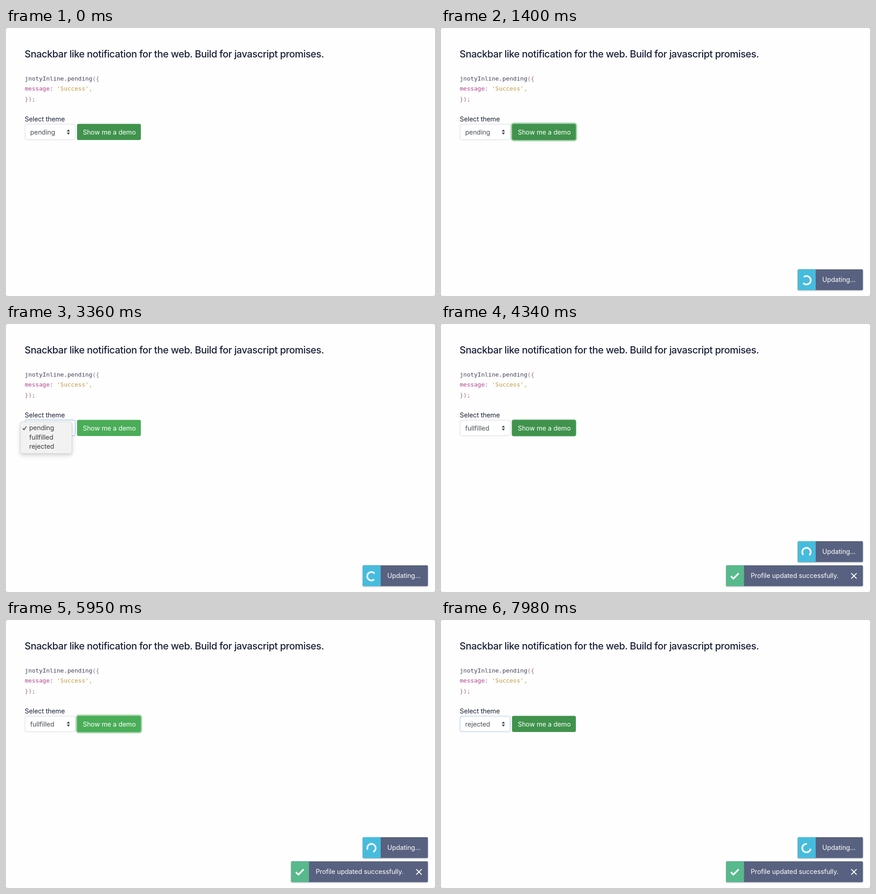
Animation of 948 by 591 pixels, one loop 8 s. Source, as an HTML page:

```html
<!DOCTYPE html>
<html lang="en">
<head>
<meta charset="utf-8">
<title>Snackbar demo</title>
<style>
  html, body { margin: 0; width: 100%; height: 100%; overflow: hidden; background: #fefefe; }
  svg { display: block; width: 100%; height: 100%; }
  text { font: 400 14.5px Inter, sans-serif; letter-spacing: -.1px; white-space: pre; }
  .title { font-size: 21.6px; font-weight: 500; letter-spacing: -.487px; fill: #1a2138; }
  .code text { font: 13.06px "DejaVu Sans Mono", monospace; letter-spacing: 0; fill: #45415f; }
  .code .key { fill: #b04889; }
  .code .str { fill: #c0993f; }
  .code .sym { fill: #997089; }
  .label { fill: #1a2138; }
  .value { fill: #495057; }
  .light { fill: #fff; }
  .toast { filter: drop-shadow(0 1px 1.5px rgba(40, 50, 80, .45)); }
  .toast text { letter-spacing: -.14px; }
  #menu .panel { filter: drop-shadow(0 4px 4px rgba(0, 0, 0, .16)); }
  #menu text { fill: #3c3c3e; }
</style>
</head>
<body>
<svg viewBox="0 0 948 591">
  <rect width="948" height="591" fill="#fefefe"/>
  <path d="M0 0h2L0 2zM948 0v2l-2-2zM0 591v-2l2 2zM948 591h-2l2-2z" fill="#9a9a9a"/>

  <text class="title" x="41" y="65">Snackbar like notification for the web. Build for javascript promises.</text>

  <g class="code">
    <text x="41.5" y="116">jnotyInline.pending<tspan class="sym">({</tspan></text>
    <text x="41.5" y="138.3" class="key">message: <tspan class="str">'Success',</tspan></text>
    <text x="41.5" y="160.5" class="sym">});</text>
  </g>

  <text class="label" x="41.5" y="206">Select theme</text>

  <rect id="glow" x="42" y="212" width="111" height="34.5" rx="3.7" fill="none" stroke="#d6e6fb" stroke-width="3"/>
  <rect id="field" x="42" y="212" width="111" height="34.5" rx="3.7" fill="#fff"/>
  <text id="value" class="value" x="53.5" y="235"></text>
  <path d="M134.2 228.3l3.6-4.2 3.6 4.2zM134.2 230.7l3.6 4.2 3.6-4.2z" fill="#3a4048"/>

  <rect id="ring" fill="#a8d4ad"/>
  <rect id="button" x="157" y="211.5" width="141" height="35.5" rx="3.7"/>
  <text class="light" x="169.7" y="235">Show me a demo</text>

  <g id="menu">
    <rect class="panel" x="31.5" y="215.8" width="114.3" height="70" rx="4.5" fill="#f2f2f2" stroke="#c9c9c9" stroke-width=".8"/>
    <rect id="mark" x="31.5" width="114.3" height="20.6" fill="#6b9ff4"/>
    <g id="items"></g>
    <path id="tick" fill="none" stroke="#333" stroke-width="1.6" d="M37 0l2.7 3.1 5.2-7.2"/>
  </g>

  <g id="updating" class="toast">
    <rect x="788.6" y="532.2" width="143.6" height="45.8" rx="2" fill="#58617f"/>
    <path d="M828 532.2v45.8h-37.4q-2 0-2-2v-41.8q0-2 2-2z" fill="#46bcdd"/>
    <path id="spinner" d="M6.4-6.7A9.3 9.3 0 1 0 6.4 6.7" fill="none" stroke="#fff" stroke-width="3.6"/>
    <text class="light" x="842.6" y="560">Updating...</text>
  </g>

  <g id="done" class="toast">
    <rect x="630.2" y="532.2" width="302" height="45.8" rx="2" fill="#58617f"/>
    <path d="M669.6 532.2v45.8h-37.4q-2 0-2-2v-41.8q0-2 2-2z" fill="#57b98c"/>
    <path d="M640.6 556l5.6 5.5 11.6-11.8" fill="none" stroke="#fff" stroke-width="3.6"/>
    <text class="light" x="684.5" y="560">Profile updated successfully.</text>
    <path d="M906.5 549.5l12 12m0-12l-12 12" stroke="#fff" stroke-width="1.8"/>
  </g>
</svg>
<script>
const LOOP = 8000, STEP = 70, FADE = 150, SPIN = 785;
const ROW = 20.5;
const BUTTON = { x: 157, y: 211.5, width: 141, height: 35.5, rx: 3.7 };
const themes = ['pending', 'fullfilled', 'rejected'];
const $ = id => document.getElementById(id);
const set = (id, attrs) => {
  for (const k in attrs) $(id).setAttribute(k, attrs[k]);
};
const show = (id, on) => set(id, { opacity: +on });

// pointer and focus times
const clicks = [420, 4270];
const menus = [
  { open: 3010, hover: 3640, pick: 3850, from: 0 },
  { open: 6370, hover: 6720, pick: 7630, from: 1 }
];
const hovers = [[-FADE, 2240], [4060, 5740], [7770, 9000]];

$('items').innerHTML = themes
  .map((name, i) => `<text x="51.3" y="${234 + i * ROW}">${name}</text>`).join('');

const ease = x => {
  x = Math.min(1, Math.max(0, x));
  return x * x * (3 - 2 * x);
};
// 0..1 level that rises at a and falls at b
const level = (t, a, b) => ease((t - a) / FADE) - ease((t - b) / FADE);
const sum = (list, f) => list.reduce((s, x, i) => s + f(x, i), 0);
const mix = (a, b, k) => `rgb(${a.map((v, i) => Math.round(v + (b[i] - v) * k))})`;

function drawButton(t) {
  const hover = sum(hovers, ([a, b]) => level(t, a, b));
  const ring = sum(clicks, (c, i) => level(t, c, menus[i].open)) * 2.9;
  const { x, y, width, height, rx } = BUTTON;
  set('button', { fill: mix([74, 173, 88], [64, 147, 77], hover) });
  set('ring', {
    x: x - ring, y: y - ring, rx: rx + ring,
    width: width + 2 * ring, height: height + 2 * ring
  });
}

function drawSelect(t) {
  const focused = t >= menus[1].open || (t >= menus[0].open && t < clicks[1]);
  set('field', { stroke: focused ? '#9fc1ee' : '#d3d7dc' });
  show('glow', focused && menus.some(m => t >= m.open && t < m.pick));
  $('value').textContent = themes[menus.filter(m => t >= m.pick).length];

  const menu = menus.find(m => t >= m.open && t < m.pick + FADE);
  set('menu', { display: menu ? 'inline' : 'none' });
  if (!menu) return;
  const { from, hover, pick } = menu, next = from + 1;
  const lit = t >= hover;
  set('menu', { transform: `translate(0 ${-from * ROW})`, opacity: 1 - ease((t - pick) / FADE) });
  set('mark', { y: 219.4 + next * ROW, opacity: +lit });
  set('tick', { transform: `translate(0 ${230 + from * ROW})` });
  [...$('items').children].forEach((el, i) => {
    el.style.fill = lit && i === next ? '#fff' : '';
  });
}

function drawToasts(t) {
  show('updating', t >= clicks[0]);
  show('done', t >= clicks[1]);
  set('updating', { transform: `translate(0 ${t >= clicks[1] ? -53.3 : 0})` });
  const turn = (185 + (t - 1400) / SPIN * 360) % 360;
  set('spinner', { transform: `translate(807.6 556.3) rotate(${turn})` });
}

function draw(ms) {
  const t = Math.floor(ms % LOOP / STEP) * STEP;
  drawButton(t);
  drawSelect(t);
  drawToasts(t);
}

const start = performance.now();
function tick() {
  draw(performance.now() - start);
  requestAnimationFrame(tick);
}
tick();
</script>
</body>
</html>
```
